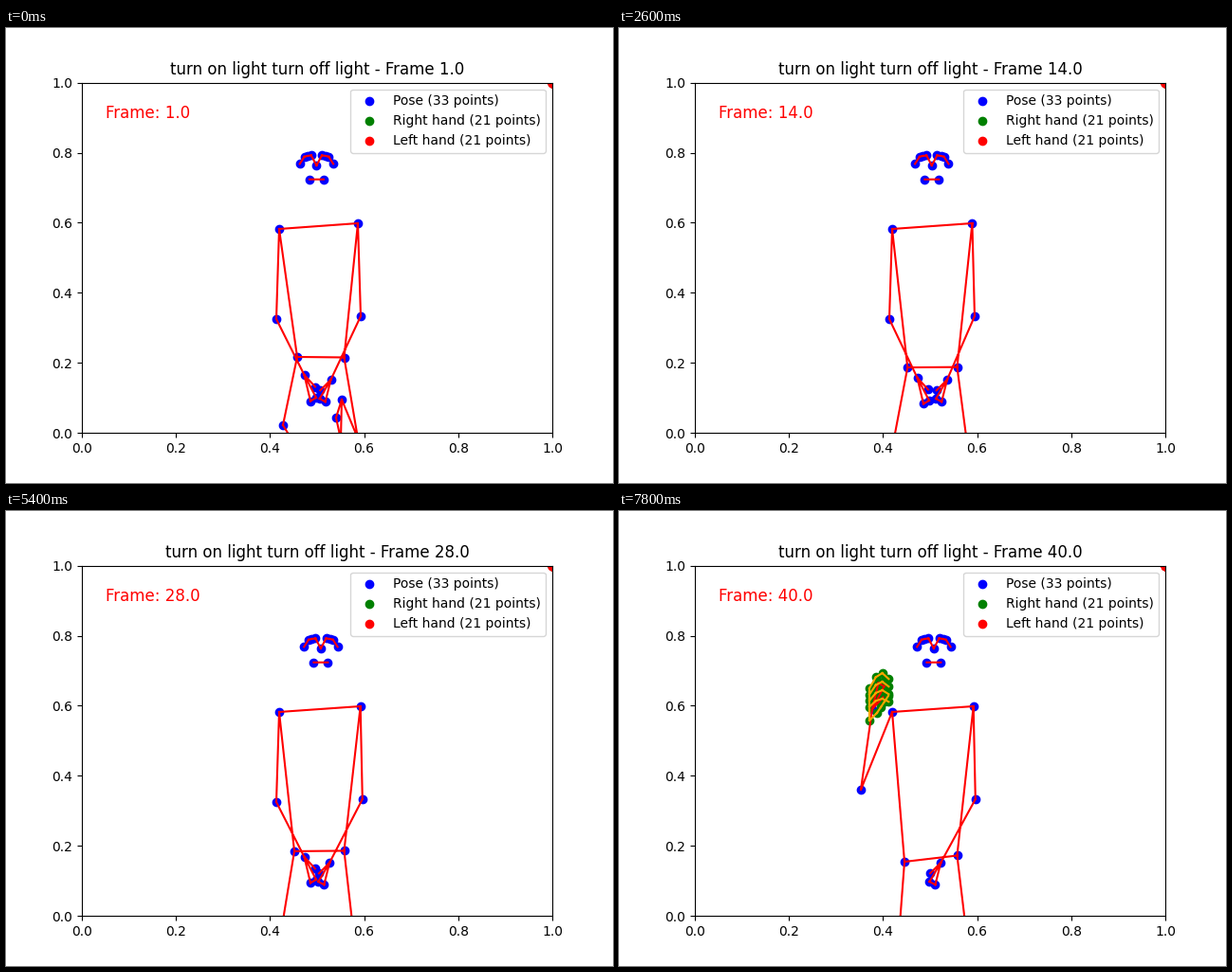
Recreate the animation shown at these times as a matplotlib script. Size 640 by 480 pixels, loop 8000 ms.

```python
import numpy as np
import matplotlib.pyplot as plt
from matplotlib.animation import FuncAnimation

FRAMES = 40
LIFT = 28           # the arm starts to rise
HAND_SEEN = 39      # the raised hand is detected

SIDE_BONES = [(11, 13), (13, 15), (15, 17), (15, 19), (15, 21), (17, 19),
              (11, 23), (23, 25), (25, 27), (27, 29), (29, 31), (27, 31)]
POSE_BONES = ([(0, 1), (1, 2), (2, 3), (3, 7), (0, 4), (4, 5), (5, 6), (6, 8),
               (9, 10), (11, 12), (23, 24)]
              + SIDE_BONES + [(a + 1, b + 1) for a, b in SIDE_BONES])
HAND_BONES = ([(0, 1), (0, 5), (5, 9), (9, 13), (13, 17), (0, 17)]
              + [(b + k, b + k + 1) for b in range(1, 21, 4) for k in range(3)])


def ease(n, start, end):
    t = np.clip((n - start) / (end - start), 0, 1)
    return t * t * (3 - 2 * t)


def through(a, mid, b, t):
    """Parabolic path from a through mid to b."""
    a, mid, b = map(np.array, (a, mid, b))
    return a * (1 - t) * (1 - 2 * t) + 4 * mid * t * (1 - t) + b * t * (2 * t - 1)


def to_data(px):
    return np.column_stack([(px[:, 0] - 80) / 496, (427.2 - px[:, 1]) / 369.6])


def face(drift):
    """Nose, eyes, ears and mouth, mirrored about the nose."""
    half = [(5.6, -10.6), (9.8, -10), (12.9, -9.2), (17.7, -1.6), (7.5, 14.7)]
    left = np.array(half)
    right = left * [-1, 1]
    pts = np.vstack([[(0, 0)], left[:3], right[:3], left[3:4], right[3:4],
                     left[4:], right[4:]])
    return pts + [327.4 + drift, 145]


def right_wrist(n):
    sway = np.sin(np.pi * (n - 1) / 24)
    return through((314.5, 366 + 3 * sway), (303, 265), (267, 209), ease(n, LIFT, FRAMES))


def pose_points(n):
    drift = 4.5 * ease(n, 1, 26)
    sway = np.sin(np.pi * (n - 1) / 24)
    settle = np.exp(-(n - 1) / 5)
    lift = ease(n, LIFT, FRAMES)
    sink = min(1.4 * (n - 1), 31)

    pts = np.zeros((33, 2))
    pts[:11] = face(drift)
    pts[11] = 371 + 0.6 * drift, 206
    pts[12] = 288, 212
    pts[13] = 374 + 0.4 * drift, 304
    pts[14] = through((285, 307), (278, 306), (255, 294), lift)

    # Left hand sways sideways; the right one flips upwards as the arm rises.
    pts[15:22:2] = [(342.5, 371), (336.7, 394.3), (330.7, 391), (331.3, 382.3)]
    pts[15:22:2, 0] += 3.5 * sway
    flip = [1, 1 - 2 * ease(n, LIFT, 34)]
    fingers = np.array([(6.5, 27.5), (12.5, 24), (11.5, 12.5)])
    pts[16] = right_wrist(n)
    pts[18:23:2] = pts[16] + fingers * flip

    pts[23] = 356.5, 358.5 - 11 * settle + 5 * lift
    pts[24] = 304 + 3 * settle - 3 * lift, 359 - 12 * settle + 11 * lift
    pts[25] = 368.5 + 2.5 * settle, 433 + sink
    pts[26] = 289 + 3 * settle + 6 * lift, 419 + sink
    pts[27:32:2] = [(354, 392), (348, 411), (353, 434)]
    pts[27:32:2, 1] += 14 * (n - 1)
    pts[28:33:2] = pts[27:32:2] + [-44, 56]
    return to_data(pts)


def hand_points(n):
    """Curled hand: a straight thumb and four nested finger arches."""
    if n < HAND_SEEN:
        return np.ones((21, 2))
    pts = [(264, 221)] + [(268 + 4 * j, 219 - 6 * j) for j in range(1, 5)]
    for k in range(4):
        height = 16 - 2.5 * k
        pts += [(264 + 6.8 * j, 187 + 6.5 * k - height * np.sin(np.pi * j / 3.8))
                for j in range(4)]
    return to_data(np.array(pts) + right_wrist(n) - right_wrist(FRAMES))


def segments(pts, bones):
    gap = [np.nan, np.nan]
    return np.array([p for a, b in bones for p in (pts[a], pts[b], gap)]).T


fig, ax = plt.subplots(figsize=(6.4, 4.8), dpi=100)
ax.set_xlim(0, 1)
ax.set_ylim(0, 1)
pose_dots = ax.scatter([], [], c="blue", label="Pose (33 points)")
right_dots = ax.scatter([], [], c="green", label="Right hand (21 points)")
left_dots = ax.scatter(np.ones(21), np.ones(21), c="red", label="Left hand (21 points)")
pose_lines, = ax.plot([], [], color="red")
hand_lines, = ax.plot([], [], color="orange")
ax.legend(loc="upper right")
counter = ax.text(0.05, 0.9, "", color="red", fontsize=12)
title = ax.set_title("")


def update(i):
    n = i + 1
    pose, hand = pose_points(n), hand_points(n)
    pose_dots.set_offsets(pose)
    right_dots.set_offsets(hand)
    pose_lines.set_data(*segments(pose, POSE_BONES))
    hand_lines.set_data(*segments(hand, HAND_BONES))
    hand_lines.set_visible(n >= HAND_SEEN)
    counter.set_text(f"Frame: {n:.1f}")
    title.set_text(f"turn on light turn off light - Frame {n:.1f}")
    return pose_dots, right_dots, pose_lines, hand_lines, counter, title


anim = FuncAnimation(fig, update, frames=FRAMES, interval=200, repeat=True, repeat_delay=0)
plt.show()
```
